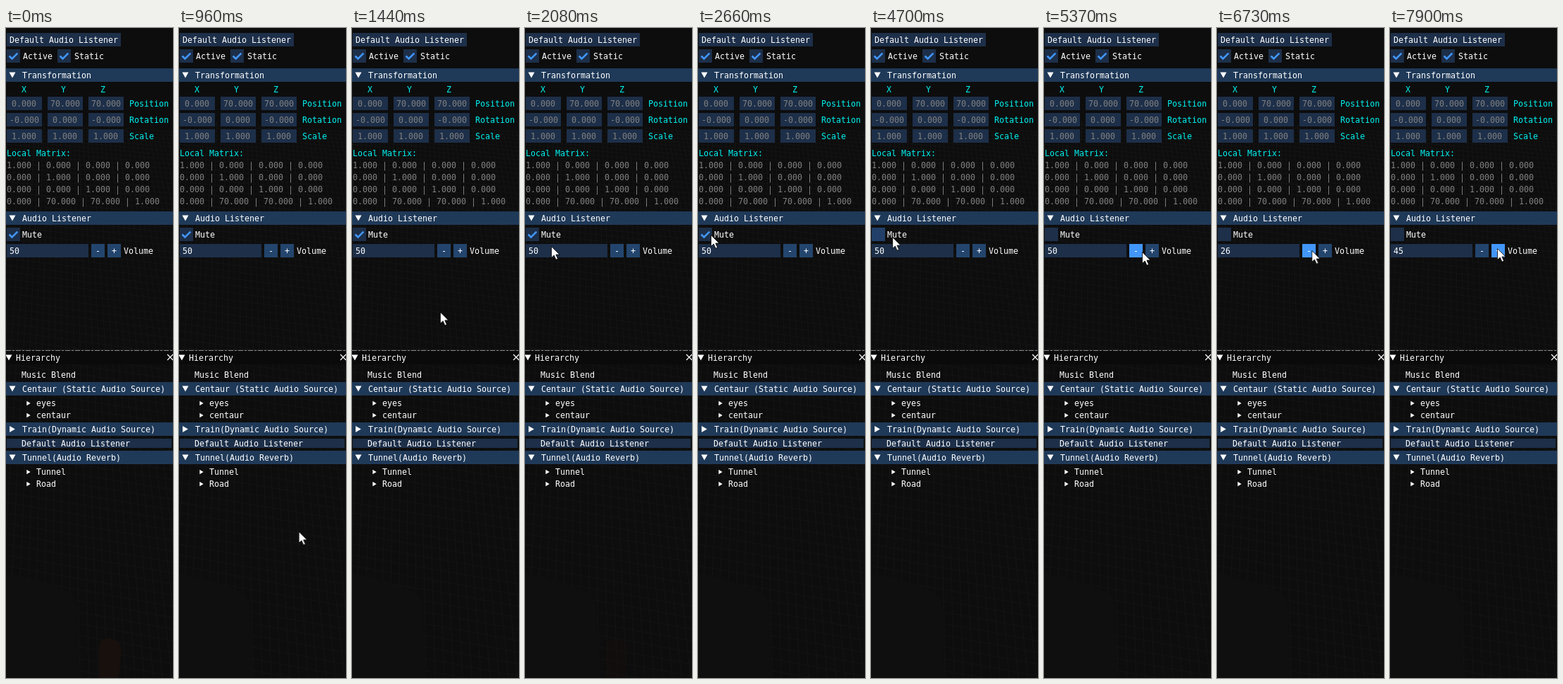
Recreate the animation shown at these times as an HTML page. Size 237x918 px, loop 8000 ms.

```html
<!DOCTYPE html>
<html lang="en">
<head>
<meta charset="utf-8">
<title>Audio listener inspector</title>
<style>
@property --volume { syntax: '<integer>'; inherits: false; initial-value: 50; }

:root {
  --frame: #1d2f49;
  --frame-hover: #213f68;
  --frame-active: #30699f;
  --button: #23456d;
  --hover: #4296fa;
  --active: #0f87fa;
}
html, body { margin: 0; width: 100%; height: 100%; overflow: hidden; background: #0d0d0d; }
svg { display: block; width: 100%; height: 100%; }
text, .volume { font: 11.63px 'DejaVu Sans Mono', 'Liberation Mono', monospace; white-space: pre; }
text { fill: #fff; }
.cyan text { fill: #00f2f2; }
.dim text { fill: #808080; }
.head { fill: #1f3958; }
.frame { fill: var(--frame); }
.button { fill: var(--button); }
.arrow { fill: #fff; }
.tick { fill: none; stroke: var(--hover); stroke-width: 2.6; }

.pointer { animation: move 8s linear infinite; }
.box { animation: box 8s step-end infinite; }
.mark { animation: mark 8s step-end infinite; }
.minus { animation: minus 8s step-end infinite; }
.plus { animation: plus 8s step-end infinite; }
.train { fill: #17100d; animation: train 8s linear infinite; }
.volume {
  color: #fff; line-height: 13px;
  counter-reset: volume var(--volume);
  animation: count 8s linear infinite;
}
.volume::after { content: counter(volume); }

@keyframes move {
  0%, 3.37% { transform: translate(180px, 930px); }
  3.375% { transform: translate(179px, 902px); }
  5% { transform: translate(166px, 805px); }
  6.375%, 11.7% { transform: translate(172px, 727px); }
  18% { transform: translate(125px, 401px); }
  21.875% { transform: translate(74px, 340px); }
  26% { transform: translate(37px, 308px); }
  31.625%, 32.2% { transform: translate(23px, 292px); }
  33.25%, 46.5% { transform: translate(18px, 292px); }
  46.875% { transform: translate(14px, 291px); }
  49.375%, 57.7% { transform: translate(10px, 291px); }
  64.625%, 66.75% { transform: translate(141px, 317px); }
  67.125% { transform: translate(139px, 316px); }
  69.5%, 84.125% { transform: translate(134px, 314px); }
  84.875%, 86.1% { transform: translate(147px, 312px); }
  89.75%, 100% { transform: translate(152px, 311px); }
}
@keyframes box {
  0%, 60%, 100% { fill: var(--frame); }
  40.25%, 52.25% { fill: var(--frame-active); }
  41.5%, 53.5% { fill: var(--frame-hover); }
}
@keyframes mark {
  0% { opacity: 1; }
  53.5%, 100% { opacity: 0; }
}
@keyframes minus {
  0%, 64.5%, 84.6%, 100% { fill: var(--button); }
  63.6%, 67.125%, 84% { fill: var(--hover); }
  72.375% { fill: var(--active); }
}
@keyframes plus {
  0% { fill: var(--button); }
  84.6%, 98.75%, 100% { fill: var(--hover); }
  89.75% { fill: var(--active); }
}
@keyframes count {
  0%, 76.12% { --volume: 50; }
  76.125% { --volume: 49; }
  83.75%, 93.49% { --volume: 26; }
  93.5% { --volume: 27; }
  98.6%, 100% { --volume: 45; }
}
@keyframes train {
  0%, 3% { opacity: 1; transform: none; }
  7%, 23% { opacity: 0; transform: none; }
  23.1% { opacity: 0; transform: translateX(-18px); }
  25%, 27% { opacity: .4; transform: translateX(-18px); }
  30%, 100% { opacity: 0; transform: translateX(-18px); }
}
</style>
</head>
<body>
<svg viewBox="0 0 237 918" preserveAspectRatio="none">
  <defs>
    <path id="down" class="arrow" d="M-4.5-3.9H4.5L0 3.9z"/>
    <path id="right" class="arrow" d="M-3.9-4.5V4.5L3.9 0z"/>
    <path id="small" class="arrow" d="M-2.7-3.2V3.2L2.7 0z"/>
    <path id="tick" class="tick" d="M3.6 9.5 7.5 13.4 15.4 5.6"/>
    <clipPath id="floor"><path d="M0 128 237 146V918H0z"/></clipPath>
  </defs>

  <rect width="237" height="918" fill="#0d0d0d"/>
  <path id="grid" clip-path="url(#floor)" fill="none" stroke="#161616" stroke-width=".8"/>
  <path d="M0 770Q45 777 88 797Q102 803 102 835L104 918H0z" fill="#0f0f0f"/>
  <path class="train" d="M132 918V872Q133 862 146 862Q163 863 164 880L160 918z"/>

  <!-- Inspector -->
  <rect class="frame" x="1" y="7" width="162" height="19"/>
  <text x="5" y="21">Default Audio Listener</text>
  <rect class="frame" x="1" y="30" width="19" height="19"/>
  <rect class="frame" x="73" y="30" width="19" height="19"/>
  <use href="#tick" x="1" y="30"/>
  <use href="#tick" x="73" y="30"/>
  <text x="24" y="44">Active</text>
  <text x="97" y="44">Static</text>

  <rect class="head" y="57" width="237" height="19"/>
  <use href="#down" x="9" y="66.5"/>
  <text x="23" y="71">Transformation</text>
  <g class="cyan">
    <text x="22" y="91">X</text>
    <text x="78" y="91">Y</text>
    <text x="134" y="91">Z</text>
    <text x="175" y="111">Position</text>
    <text x="175" y="134">Rotation</text>
    <text x="175" y="157">Scale</text>
    <text x="1" y="181">Local Matrix:</text>
  </g>
  <g id="fields" class="dim"></g>
  <g class="dim">
    <text x="1" y="198">1.000 | 0.000 | 0.000 | 0.000</text>
    <text x="1" y="215">0.000 | 1.000 | 0.000 | 0.000</text>
    <text x="1" y="232">0.000 | 0.000 | 1.000 | 0.000</text>
    <text x="1" y="249">0.000 | 70.000 | 70.000 | 1.000</text>
  </g>

  <rect class="head" y="259" width="237" height="19"/>
  <use href="#down" x="9" y="268.5"/>
  <text x="23" y="273">Audio Listener</text>
  <rect class="frame box" x="1" y="282" width="19" height="19"/>
  <g class="mark"><use href="#tick" x="1" y="282"/></g>
  <text x="23" y="296">Mute</text>
  <rect class="frame" x="1" y="305" width="116" height="19"/>
  <foreignObject x="5" y="308.5" width="60" height="14"><div class="volume"></div></foreignObject>
  <rect class="button minus" x="121" y="305" width="19" height="19"/>
  <rect class="button plus" x="144" y="305" width="19" height="19"/>
  <text x="127" y="319">-</text>
  <text x="150" y="319">+</text>
  <text x="167" y="319">Volume</text>

  <!-- Hierarchy -->
  <rect y="454" width="237" height="2" fill="#1c1c1e"/>
  <path d="M0 455.5H237" stroke="#85858a" stroke-dasharray="7 2 3 2"/>
  <rect y="456" width="237" height="19" fill="#0a0a0a"/>
  <use href="#down" x="4" y="465.5"/>
  <text x="14" y="470">Hierarchy</text>
  <path d="M229 461 237 469M237 461 229 469" stroke="#fff" stroke-width="1.2"/>
  <text x="22" y="494">Music Blend</text>

  <rect class="head" y="500" width="237" height="19"/>
  <use href="#down" x="9" y="509.5"/>
  <text x="23" y="514">Centaur (Static Audio Source)</text>
  <use href="#small" x="32" y="530"/>
  <text x="43" y="534">eyes</text>
  <use href="#small" x="32" y="547"/>
  <text x="43" y="551">centaur</text>

  <rect class="head" y="557" width="237" height="19"/>
  <use href="#right" x="9" y="566.5"/>
  <text x="23" y="571">Train(Dynamic Audio Source)</text>
  <rect x="1" y="580" width="234" height="13" fill="#1d2f49"/>
  <text x="22" y="591">Default Audio Listener</text>

  <rect class="head" y="597" width="237" height="19"/>
  <use href="#down" x="9" y="606.5"/>
  <text x="23" y="611">Tunnel(Audio Reverb)</text>
  <use href="#small" x="32" y="627"/>
  <text x="43" y="631">Tunnel</text>
  <use href="#small" x="32" y="644"/>
  <text x="43" y="648">Road</text>

  <path class="pointer" d="M.5.5V16.5L4.2 13 7 19.2 9.6 18.1 6.9 12H12z" fill="#fff" stroke="#000" stroke-width=".8"/>
</svg>
<script>
const byId = id => document.getElementById(id);

// Vector fields, three per row
const rows = [
  ['0.000', '70.000', '70.000'],
  ['-0.000', '0.000', '-0.000'],
  ['1.000', '1.000', '1.000']
];
byId('fields').innerHTML = rows.map((row, r) => row.map((value, c) => {
  const x = 1 + 58 * c;
  const y = 97 + 23 * r;
  const textX = x + Math.floor((50 - 7 * value.length) / 2);
  return `<rect class="frame" x="${x}" y="${y}" width="50" height="19"/>` +
    `<text x="${textX}" y="${y + 14}">${value}</text>`;
}).join('')).join('');

// Floor lines spread apart towards the viewer
let path = '';
for (let i = 0; i < 80; i++) {
  const y = 110 + 4 * i + 0.085 * i * i;
  path += `M0 ${y}L237 ${y + 18 + i * 0.35}`;
}
for (let i = -12; i < 50; i++) path += `M${i * 6} 120L${i * 13 - 90} 918`;
byId('grid').setAttribute('d', path);
</script>
</body>
</html>
```
